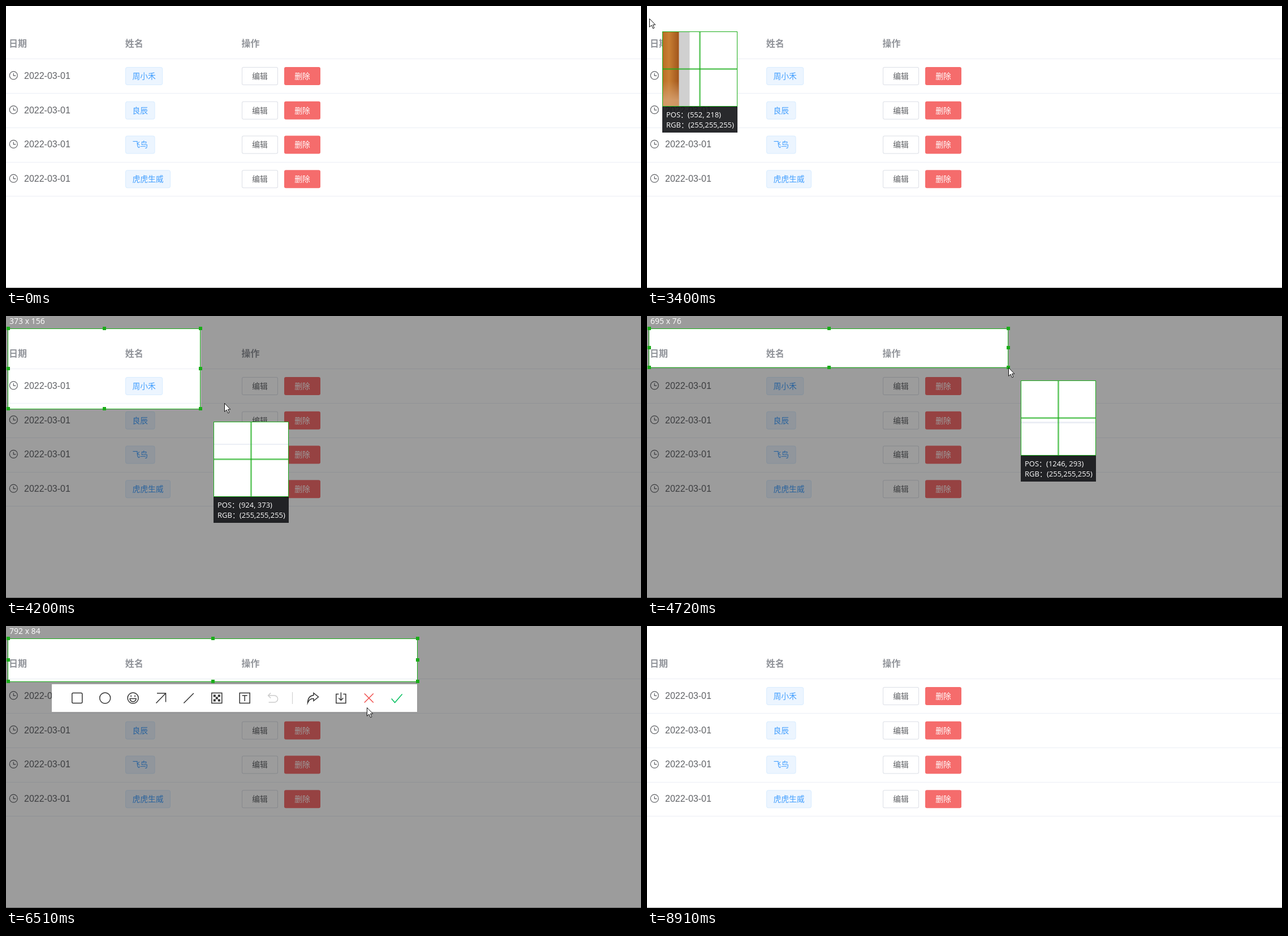
An HTML page with a canvas that plays this animation: 1123 px wide and 499 px high, repeating every 9830 ms.

```html
<!DOCTYPE html>
<html lang="zh-CN">
<head>
<meta charset="utf-8">
<style>
html, body { margin: 0; width: 100%; height: 100%; overflow: hidden; background: #fff; }
canvas { display: block; }
</style>
</head>
<body>
<canvas id="stage" width="1123" height="499"></canvas>
<script>
const W = 1123, H = 499, LOOP = 9830, STEP = 70;
const CJK = '"Noto Sans CJK SC", "Noto Sans CJK", sans-serif';
const UI = '"Open Sans", ' + CJK;
const GREEN = '#1aad19', INK = '#333';
const LOUPE = 132, ZOOM = 2.75, DPI = 1.093;
const TIME = { enter: 120, loupe: 1670, drag: 3540, release: 5800, cancel: 7720, leave: 8900 };
const START = { x: 4, y: 22 }, END = { x: 727.7, y: 98 };

// The pointer rests between moves
const ENTRY = { x: 1106, y: 428 };
const MOVES = [
  { from: 120, to: 1360, x: 896, y: 260 },
  { from: 1670, to: 2170, x: 89.3, y: 118 },
  { from: 2170, to: 2700, x: -9, y: 25 },
  { from: 2870, to: 3080, x: 4.2, y: 22 },
  { from: 3500, to: 3570, x: 150.4, y: 188.5 },
  { from: 3570, to: 3710, x: 176, y: 206 },
  { from: 3850, to: 4620, x: 639, y: 90.5 },
  { from: 4830, to: 5220, x: 770, y: 98 },
  { from: 5460, to: 5740, ...END },
  { from: 5800, to: 6350, x: 638, y: 144 },
  { from: 6510, to: 6940, x: 657, y: 128 },
  { from: 7430, to: 7490, x: 640, y: 121 },
  { from: 8080, to: 8900, x: 700, y: 505 }
];

function pointer(t) {
  let { x, y } = ENTRY;
  for (const m of MOVES) {
    const f = Math.min(1, Math.max(0, (t - m.from) / (m.to - m.from)));
    x += (m.x - x) * f;
    y += (m.y - y) * f;
  }
  return { x, y };
}

function text(g, str, x, y, font, color, align = 'left') {
  g.font = font;
  g.fillStyle = color;
  g.textAlign = align;
  g.fillText(str, x, y);
}

function box(g, x, y, w, h, r, fill, border) {
  g.beginPath();
  g.roundRect(x, y, w, h, r);
  g.fillStyle = border;
  g.fill();
  g.beginPath();
  g.roundRect(x + 1, y + 1, w - 2, h - 2, r - 1);
  g.fillStyle = fill;
  g.fill();
}

function clock(g, x, y) {
  g.strokeStyle = '#606266';
  g.lineWidth = 1.2;
  g.beginPath();
  g.arc(x, y, 7, 0, 7);
  g.moveTo(x, y - 4);
  g.lineTo(x, y + .5);
  g.lineTo(x + 4, y + .5);
  g.stroke();
}

const page = document.createElement('canvas');
page.width = W;
page.height = H;
const pg = page.getContext('2d', { alpha: false, willReadFrequently: true });

function drawPage() {
  pg.fillStyle = '#fff';
  pg.fillRect(0, 0, W, H);
  ['日期', '姓名', '操作'].forEach((s, i) =>
    text(pg, s, 5 + i * 205.7, 72, 'bold 16px ' + CJK, '#909399'));
  pg.fillStyle = '#ebeef5';
  for (let i = 0; i < 5; i++) pg.fillRect(0, Math.round(93.2 + 60.8 * i), W, 1);
  pg.fillStyle = '#a8a8a8';
  pg.fillRect(0, 498, W, 1);

  const font = '13.75px ' + CJK;
  ['周小禾', '良辰', '飞鸟', '虎虎生威'].forEach((name, i) => {
    const y = 107.9 + 60.75 * i, base = Math.round(y + 21);
    clock(pg, 13.3, y + 15);
    text(pg, '2022-03-01', 32, base, '16px "Liberation Sans", Arial, sans-serif', '#606266');
    box(pg, 211, y, 25 + 13.75 * name.length, 32, 4, '#ecf5ff', '#d9ecff');
    text(pg, name, 223.5, base, font, '#409eff');
    box(pg, 417, y, 64, 32, 3, '#fff', '#dcdfe6');
    text(pg, '编辑', 449, base, font, '#606266', 'center');
    box(pg, 492, y, 64, 32, 3, '#f56c6c', '#f56c6c');
    text(pg, '删除', 524, base, font, '#fff', 'center');
  });
}

const c = document.getElementById('stage').getContext('2d');

// Colour under the pointer; glyph edges read as a bluish fringe
function sample({ x, y }) {
  if (x < 0) return '208,208,208';
  const d = pg.getImageData(Math.round(x) - 1, Math.round(y) - 1, 3, 3).data;
  const onGlyph = d.some((v, i) => i % 4 === 0 && v < 200);
  return onGlyph ? '96,110,151' : d.slice(16, 19).join(',');
}

// The neighbouring window, seen only through the loupe
function drawNeighbour() {
  const wood = c.createLinearGradient(-22, 0, -9, 0);
  wood.addColorStop(0, '#b0621c');
  wood.addColorStop(.5, '#c87f33');
  wood.addColorStop(1, '#a0541a');
  c.fillStyle = wood;
  c.fillRect(-60, -60, 51, 160);
  const floor = c.createLinearGradient(0, 30, 0, 42);
  floor.addColorStop(0, 'rgba(214,160,112,0)');
  floor.addColorStop(1, 'rgba(214,160,112,.85)');
  c.fillStyle = floor;
  c.fillRect(-60, 30, 51, 80);
  c.fillStyle = '#d0d0d0';
  c.fillRect(-9, -60, 6.8, 200);
}

function drawLoupe(p) {
  const mid = LOUPE / 2;
  c.save();
  c.translate(Math.round(p.x + 22.4), Math.round(p.y + 23));
  c.save();
  c.beginPath();
  c.rect(0, 0, LOUPE, LOUPE);
  c.clip();
  c.fillStyle = '#fff';
  c.fillRect(0, 0, LOUPE, LOUPE);
  c.translate(mid, mid);
  c.scale(ZOOM, ZOOM);
  c.translate(-p.x, -p.y);
  drawNeighbour();
  c.imageSmoothingEnabled = false;
  c.drawImage(page, 0, 0);
  c.restore();

  c.fillStyle = 'rgba(26,173,25,.6)';
  c.fillRect(mid - 1, 0, 3, LOUPE);
  c.fillRect(0, mid - 1, LOUPE, 3);
  c.strokeStyle = GREEN;
  c.lineWidth = 1;
  c.strokeRect(.5, .5, LOUPE, LOUPE);
  c.fillStyle = 'rgba(24,25,28,.93)';
  c.fillRect(0, LOUPE + 1, LOUPE + 1, 46);
  const pos = [547.6 + DPI * p.x, 194 + DPI * p.y].map(Math.round).join(', ');
  text(c, `POS：(${pos})`, 7, 152, '13px ' + UI, '#fff');
  text(c, `RGB：(${sample(p)})`, 7, 170, '13px ' + UI, '#fff');
  c.restore();
}

function drawSelection(p) {
  const { x, y } = START, w = p.x - x, h = p.y - y;
  c.fillStyle = 'rgba(0,0,0,.39)';
  c.beginPath();
  c.rect(0, 0, W, H);
  c.rect(x, y, w, h);
  c.fill('evenodd');
  c.strokeStyle = GREEN;
  c.lineWidth = 1;
  c.strokeRect(x - .5, y + .5, Math.round(w), Math.round(h));
  c.fillStyle = GREEN;
  for (const i of [0, .5, 1])
    for (const j of [0, .5, 1])
      if (i !== .5 || j !== .5) c.fillRect(Math.round(x + w * i) - 3, Math.round(y + h * j) - 3, 6, 6);
  const size = [w, h].map(v => Math.round(1 + v * DPI)).join(' x ');
  text(c, size, 6, 14, '14px ' + UI, '#fff');
}

// Tool icons around their own centre
const path = d => () => c.stroke(new Path2D(d));
const square = (r = 0) => {
  c.beginPath();
  c.roundRect(-9, -9, 18, 18, r);
  c.stroke();
};
const arc = (r, y = 0, end = 2 * Math.PI) => {
  c.beginPath();
  c.arc(0, y, r, 0, end);
  c.closePath();
  c.stroke();
};
const EDIT_TOOLS = [
  () => square(2),
  () => arc(9.5),
  () => { arc(9.5); arc(5.5, 1, Math.PI); path('M-3.5-5v3M3.5-5v3')(); },
  path('M-8.5 9L8-8M-7-8.5H8.5V7'),
  path('M-9 9l6-6M-4 4L8.5-8.5'),
  () => {
    square();
    for (let i = 0; i < 9; i += 2) c.fillRect(i % 3 * 4 - 6, Math.floor(i / 3) * 4 - 6, 4, 4);
  },
  () => { square(); path('M-4.5-4.5h9M0-4.5v10')(); },
  () => { c.strokeStyle = '#ccc'; path('M-3.5-9L-8-4.5L-3.5 0M-8-4.5H3a6 6 0 0 1 0 12H-7')(); }
];
const FINISH_TOOLS = [
  path('M1-9L9.5-2L1 5V1Q-6 0-9.5 8.5Q-9-4 1-5Z'),
  path('M-4-7H-8.5V9H8.5V-7H4M0-10V4M-4 0L0 4L4 0'),
  () => { c.strokeStyle = '#f0504e'; path('M-8-8L8 8M8-8L-8 8')(); },
  () => { c.strokeStyle = '#07c160'; path('M-9.5 1l6 7l13-15')(); }
];

function drawTools(tools, x) {
  tools.forEach((tool, i) => {
    c.save();
    c.translate(x + 49.4 * i, 127.5);
    c.strokeStyle = c.fillStyle = INK;
    c.lineWidth = 1.5;
    tool();
    c.restore();
  });
}

function drawToolbar() {
  c.fillStyle = '#fff';
  c.fillRect(81, 103, 646, 49);
  c.fillStyle = '#ccc';
  c.fillRect(506, 117, 1, 21);
  drawTools(EDIT_TOOLS, 125.8);
  drawTools(FINISH_TOOLS, 543);
}

const ARROW = new Path2D('M.5.5V15.3L4 12L6.6 17.8L8.9 16.8L6.4 11.2H10.8Z');

function drawPointer({ x, y }) {
  c.save();
  c.translate(Math.round(x), Math.round(y));
  c.fillStyle = '#fff';
  c.strokeStyle = '#111';
  c.lineWidth = 1;
  c.fill(ARROW);
  c.stroke(ARROW);
  c.restore();
}

function draw(t) {
  const within = (a, b) => t >= a && t < b;
  // Screen captures come in steps, and the tool trails the pointer by one
  const now = Math.floor(t / STEP) * STEP;
  const focus = pointer(now - STEP);
  c.drawImage(page, 0, 0);
  if (within(TIME.drag, TIME.cancel)) drawSelection(t < TIME.release ? focus : END);
  if (within(TIME.loupe, TIME.release)) drawLoupe(focus);
  if (within(TIME.release, TIME.cancel)) drawToolbar();
  if (within(TIME.enter, TIME.leave)) drawPointer(pointer(now));
}

drawPage();
const begin = performance.now();
function tick() {
  draw((performance.now() - begin) % LOOP);
  requestAnimationFrame(tick);
}
tick();
</script>
</body>
</html>
```
